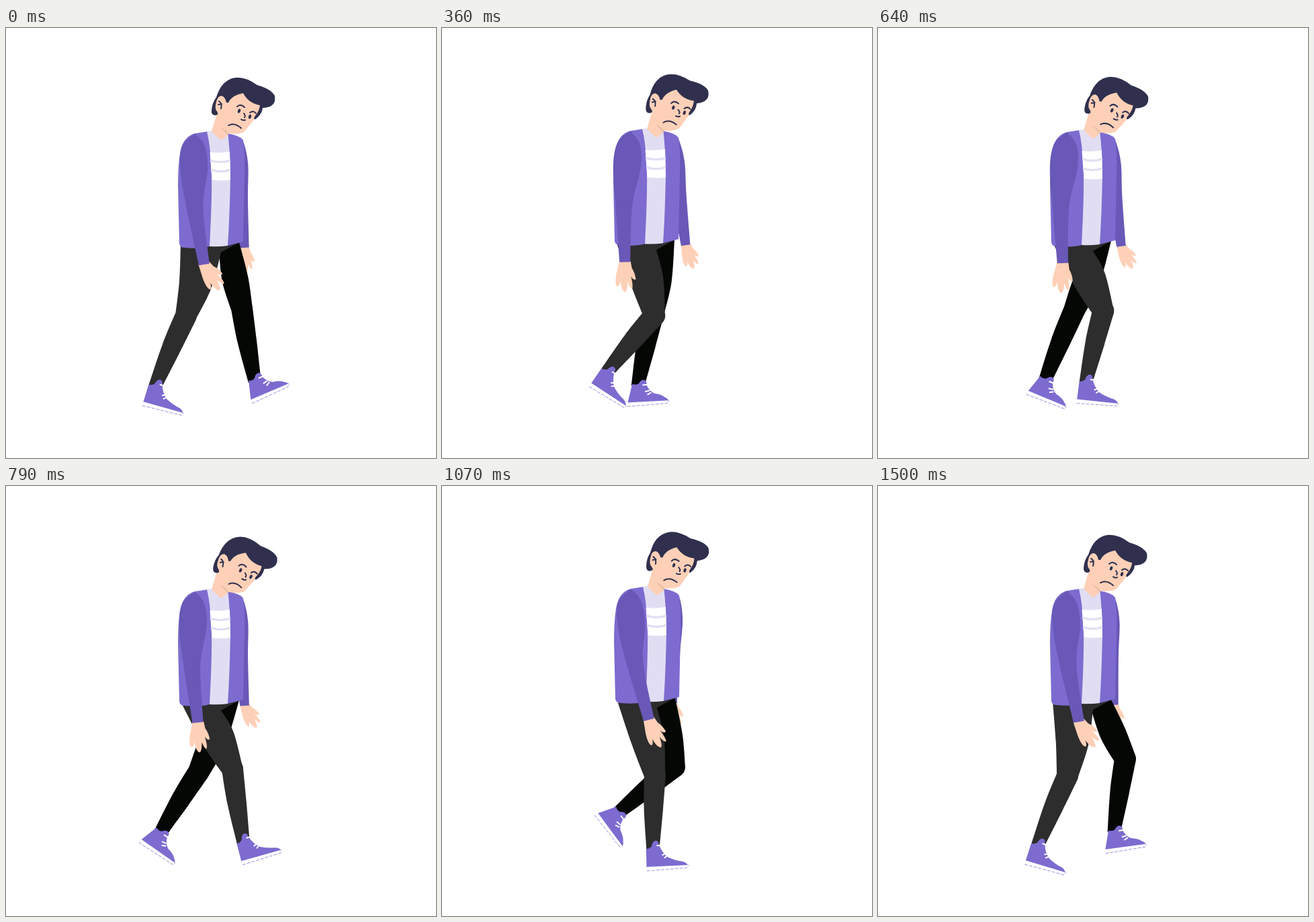
Recreate the animation shown at these times as an HTML page. Size 640 by 640 pixels, loop 1570 ms.

```html
<!DOCTYPE html>
<html lang="en">
<head>
<meta charset="utf-8">
<title>Sad walk</title>
<style>
  html, body { margin: 0; width: 100%; height: 100%; overflow: hidden; background: #fff; }
  svg { display: block; width: 100vw; height: 100vh; }
  .jacket { fill: #7d6bd0; }
  .sleeve { fill: #6958b7; }
  .skin { fill: #fed0b7; }
  .hair { fill: #30304e; }
  .shirt { fill: #e1def3; }
  .near { fill: #2d2d2d; }
  .far { fill: #040703; }
  .white { fill: #fff; }
  .line { fill: none; stroke: #30304e; stroke-width: 2; stroke-linecap: round; stroke-linejoin: round; }
  .stripe { fill: none; stroke: #e1def3; stroke-width: 3; }
  .lace { fill: none; stroke: #fff; stroke-width: 2; }
  .edge { fill: none; stroke: #7d6bd0; stroke-width: .7; stroke-dasharray: 5 2; }
</style>
</head>
<body>
<svg viewBox="0 0 640 640">
  <defs>
    <path id="hand" d="M-8-3L-9 18Q-9 36-4 38Q-1 37-1 29Q3 43 9 44Q12 42 10 28Q14 36 18 37Q20 34 13 19Q18 25 21 22Q18 13 12 7L8-3Z"/>
    <g id="sole">
      <path class="white" d="M0-6L62-4V0H0Z"/>
      <path class="edge" d="M0 0H60Q62-1 62-4"/>
    </g>
  </defs>

  <use id="farHand" href="#hand" class="skin"/>
  <path id="farArm" class="sleeve"/>
  <path id="farLeg" class="far"/>
  <g id="farShoe">
    <path class="jacket" d="M10-33Q16-30 20-33Q24-39 29-37Q32-35 31-30Q34-20 42-16Q52-14 57-9Q61-7 62-3L0-3Z"/>
    <use href="#sole"/>
    <path class="lace" d="M28-20L35-21M31-15L37-18"/>
    <path class="lace" stroke-width="3" d="M25-30H32"/>
  </g>
  <path id="nearLeg" class="near"/>
  <g id="nearShoe">
    <path class="jacket" d="M1.5-33Q6-32 10-36Q12-44 17-44Q21-43 21-38Q24-26 33-18Q44-12 54-10Q60-8 62-3L0-4Z"/>
    <use href="#sole"/>
    <path class="lace" d="M24.5-21.5L32-25M27.5-17L34-22"/>
    <path class="lace" stroke-width="3" d="M17.5-36.5H23.5"/>
  </g>

  <g id="body">
    <path class="jacket" d="M300 154L281 157Q263 162 259 186Q256 205 256 235L258 321Q259 327 266 327Q288 329 303 325L330 324L353 318L355 220Q356 188 353 167Q348 160 330 157Z"/>
    <path class="shirt" d="M299 154L306 153H330Q334 190 334 220Q333 280 330 324Q316 326 303 325Q308 230 305 200Q304 175 299 154Z"/>
    <path class="white" d="M303.5 185Q318 187 333 184L334 226Q320 228 306.500 226Z"/>
    <path class="stripe" d="M304 197Q319 202 334 197M305 211Q320 216 334 211"/>
    <path class="skin" d="M314 127L306 154Q314 162 320 167Q326 163 330 159L334 148Z"/>
    <path d="M318 146L332 156L330 159Z" fill="#e3bba2"/>
  </g>

  <use id="nearHand" href="#hand" class="skin"/>
  <path id="nearArm" class="sleeve"/>

  <g id="head">
    <path class="hair" d="M312 130Q305 130 306 122Q307 111 313 103Q321 77 341 74Q356 72 374 85Q395 91 400 101Q403 118 382 119Q381 129 371 136L330 122Z"/>
    <path class="skin" d="M331 111Q336 100 353 97Q361 112 378 115Q377 124 370 132L368 138Q361 146 355 154Q349 159 331 157L313 134Q317 128 314 124Q310 120 313 110Q315 101 321 101Q326 102 328 111Z"/>
    <path class="line" d="M317 109Q322 112 320 120M316 114L321 113M344 117Q349 112 355 118M363 126Q368 122 372 127M354 127Q357 131 355 133M350 136Q353 138 356 137M331 145Q340 140 350 149"/>
    <g class="hair">
      <ellipse cx="347" cy="123.500" rx="2" ry="3.200" transform="rotate(20 347 123.500)"/>
      <ellipse cx="363" cy="132" rx="2" ry="3.200" transform="rotate(20 363 132)"/>
    </g>
  </g>
</svg>
<script>
const LOOP = 1570, STEPS = 22, RAD = Math.PI / 180;
const TIMES = [0, 210, 500, 790, 1070, 1290, 1500];
const N = TIMES.length;
const $ = id => document.getElementById(id);

// Periodic monotone cubic through one value per key time
function track(v) {
  const gap = i => i === N - 1 ? LOOP - TIMES[i] : TIMES[i + 1] - TIMES[i];
  const rise = v.map((a, i) => (v[(i + 1) % N] - a) / gap(i));
  const slope = v.map((_, i) => {
    const a = rise[(i + N - 1) % N], b = rise[i];
    return a * b <= 0 ? 0 : 2 * a * b / (a + b);
  });
  return t => {
    let i = N - 1;
    while (TIMES[i] > t) i--;
    const j = (i + 1) % N, h = gap(i), u = (t - TIMES[i]) / h, w = 1 - u;
    return w * w * ((1 + 2 * u) * v[i] + u * h * slope[i])
         + u * u * ((3 - 2 * u) * v[j] - w * h * slope[j]);
  };
}

const turn = ([x, y], deg) => {
  const c = Math.cos(deg * RAD), s = Math.sin(deg * RAD);
  return [x * c - y * s, x * s + y * c];
};
const add = (a, b) => [a[0] + b[0], a[1] + b[1]];
const sub = (a, b) => [a[0] - b[0], a[1] - b[1]];

// Point at share u of a bone, moved sideways by o
function at(a, b, u, o) {
  const [x, y] = sub(b, a), l = Math.hypot(x, y);
  return [a[0] + x * u - y / l * o, a[1] + y * u + x / l * o];
}

const fmt = p => p.map(n => n.toFixed(2)).join(' ');

function smooth(p) {
  let d = '';
  for (let i = 0; i < p.length - 1; i++) {
    const a = p[i], b = p[i + 1], prev = p[i - 1] || a, next = p[i + 2] || b;
    const c1 = a.map((n, k) => n + (b[k] - prev[k]) / 6);
    const c2 = b.map((n, k) => n - (next[k] - a[k]) / 6);
    d += `C${fmt(c1)} ${fmt(c2)} ${fmt(b)}`;
  }
  return d;
}

function outline(left, right) {
  const back = [...right].reverse();
  return `M${fmt(left[0])}${smooth(left)}L${fmt(back[0])}${smooth(back)}Z`;
}

const bodyX = track([0, -2, 0, 0, 0, 0, 0]);
const bodyY = track([0, -3, -4, 0, -4, -4, -1]);
const nod = track([0, -4.6, -.3, 4, -3.4, 1.2, .2]);

const arms = {
  near: { wrist: track([295, 279, 269, 286, 308, 305, 299]),
          hand: track([-20, 0, 17, 8, -12, -20, -21]) },
  far: { wrist: track([355, 358, 366, 355, 343, 342, 351]),
         hand: track([7, 0, -13, -17, 4, 4, 4]) }
};

// Joint keys become bone angles and lengths
function leg(o) {
  const hips = TIMES.map(t => add(o.hip, [bodyX(t), bodyY(t)]));
  const knees = o.kx.map((x, i) => [x, o.ky[i]]);
  const ankles = o.hx.map((x, i) => add([x, o.hy[i]], turn(o.ankle, o.rot[i])));
  const bone = (a, b) => {
    const v = b.map((p, i) => sub(p, a[i]));
    const ang = track(v.map(([x, y]) => Math.atan2(x, y)));
    const len = track(v.map(([x, y]) => Math.hypot(x, y)));
    return t => [Math.sin(ang(t)) * len(t), Math.cos(ang(t)) * len(t)];
  };
  return { ...o, thigh: bone(hips, knees), shin: bone(knees, ankles), foot: track(o.rot) };
}

const legs = {
  near: leg({
    hip: [291, 333], ankle: [12, -36], tops: [[260, 321], [320, 334]], mid: [22, 27],
    kx: [268, 294, 331, 337, 317, 302, 282], ky: [428, 432, 422, 421, 430, 431, 431],
    hx: [203, 193, 241, 352, 305, 258, 218], hy: [562, 537, 533, 564, 573, 571, 563],
    rot: [14, 33, 27, -17.5, -4.6, 7.4, 15]
  }),
  far: leg({
    hip: [332, 330], ankle: [19, -33], tops: [[317, 333], [347, 319]], mid: [20, 19],
    kx: [351, 334, 300, 287, 346, 371, 368], ky: [417, 425, 418, 425, 418, 403, 406],
    hx: [366, 309, 247, 197, 227, 278, 339], hy: [559, 565, 557, 530, 490, 504, 547],
    rot: [-25, -15.5, 7.7, 33.5, 51.6, 35, -9.6]
  })
};

function drawLeg(name, t, off) {
  const g = legs[name], hip = add(g.hip, off), [tl, tr] = g.tops.map(p => add(p, off));
  const knee = add(hip, g.thigh(t)), ankle = add(knee, g.shin(t)), rot = g.foot(t);
  const end = at(knee, ankle, 1.05, 0);
  let d = outline(
    [tl, at(hip, knee, .5, g.mid[0]), at(hip, knee, 1, 16)],
    [tr, at(hip, knee, .5, -g.mid[1]), at(hip, knee, 1, -16)]);
  d += `M${fmt(add(knee, [-16, 0]))}a16 16 0 1 0 32 0a16 16 0 1 0-32 0Z`;
  d += outline(
    [at(knee, end, 0, 16), at(knee, end, .45, 15), at(knee, end, 1, 9.5)],
    [at(knee, end, 0, -16), at(knee, end, .45, -13.5), at(knee, end, 1, -9.5)]);
  if (name === 'near') {
    const pelvis = [[260, 315], [260, 322], [320, 334], [347, 319]];
    d += 'M' + pelvis.map(p => fmt(add(p, off))).join('L') + 'Z';
  }
  $(name + 'Leg').setAttribute('d', d);
  const heel = sub(ankle, turn(g.ankle, rot));
  $(name + 'Shoe').setAttribute('transform', `translate(${fmt(heel)}) rotate(${rot})`);
}

function drawArm(name, top, shoulder, elbow, wrist, widths, deg, scale) {
  const side = k => [top,
    at(shoulder, elbow, 0, k * widths[0]),
    at(shoulder, elbow, .38, k * widths[1]),
    at(shoulder, elbow, 1, k * widths[2]),
    at(elbow, wrist, 1, k * widths[3])];
  $(name + 'Arm').setAttribute('d', outline(side(1), side(-1)));
  $(name + 'Hand').setAttribute('transform',
    `translate(${fmt(wrist)}) rotate(${deg}) scale(${scale})`);
}

function draw(t) {
  const off = [bodyX(t), bodyY(t)], place = (x, y) => add([x, y], off);
  const nw = arms.near.wrist(t), fw = arms.far.wrist(t);
  drawLeg('far', t, off);
  drawLeg('near', t, off);
  drawArm('near', place(281, 157), place(279, 175),
    [281 + .45 * (nw - 295), 267 + off[1]], [nw, 352 + off[1]],
    [16.5, 20.5, 12.5, 8], arms.near.hand(t), 1);
  drawArm('far', place(349, 163), place(344, 175),
    [349 + .5 * (fw - 355), 255 + off[1]], [fw, 327 + off[1]],
    [11, 14.5, 11, 6.8], arms.far.hand(t), .83);
  const move = `translate(${fmt(off)})`;
  $('body').setAttribute('transform', move);
  $('head').setAttribute('transform', `${move} rotate(${nod(t)} 320 155)`);
}

const start = performance.now();
function tick() {
  const t = (performance.now() - start) % LOOP, step = LOOP / STEPS;
  // The walk advances in even steps rather than continuously
  draw(Math.min(STEPS - 1, Math.floor((t + 5) / step)) * step);
  requestAnimationFrame(tick);
}
tick();
</script>
</body>
</html>
```
